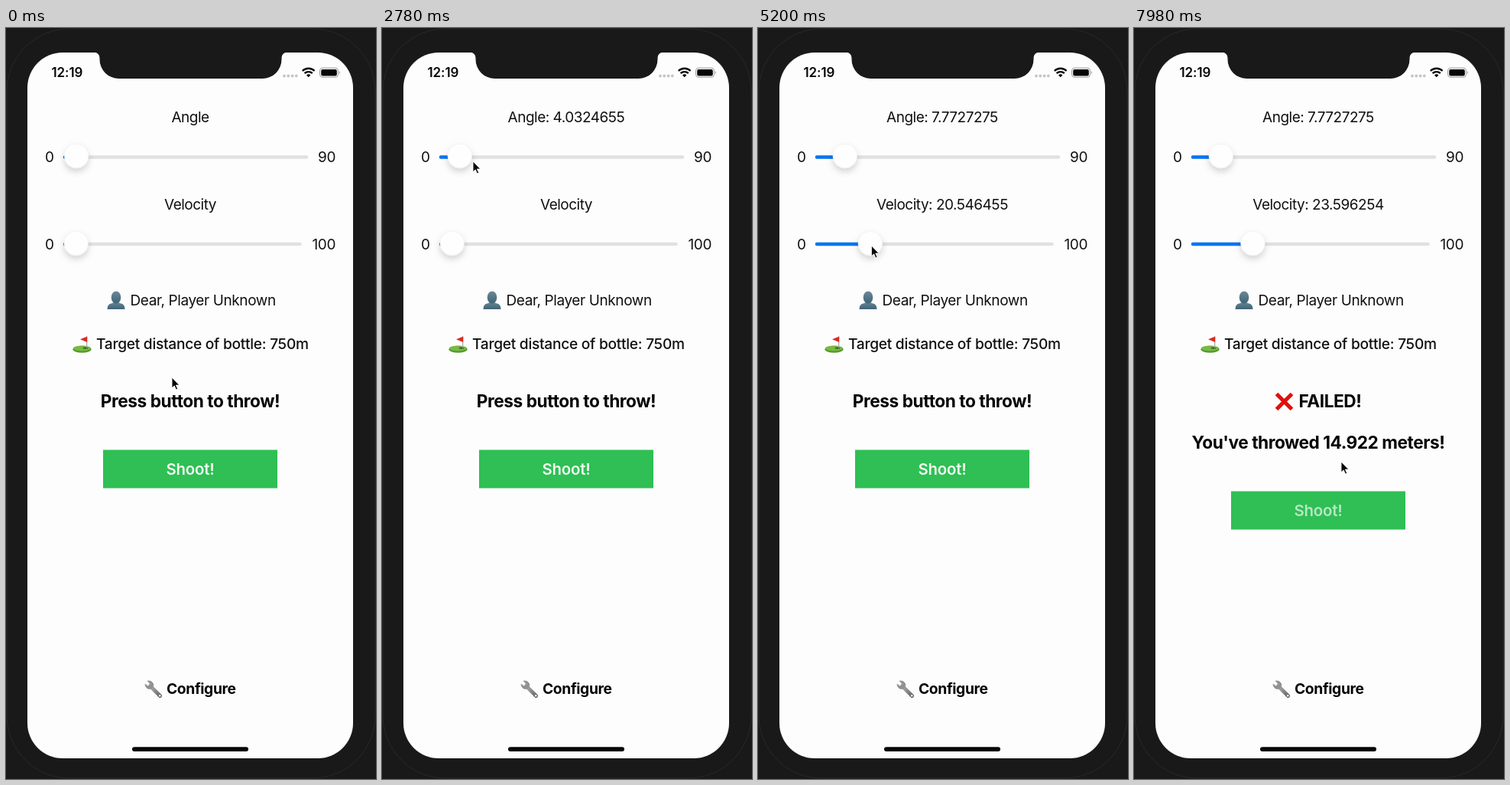
An HTML page for the animation above (8 s loop, 484 by 980 pixels).

```html
<!DOCTYPE html>
<html lang="en">
<head>
<meta charset="utf-8">
<title>Throw game</title>
<style>
  html, body { margin: 0; width: 100%; height: 100%; overflow: hidden; background: #19191a; }
  svg { display: block; width: 100vw; height: 100vh; }
  text { font: 400 19px Inter, Roboto, sans-serif; letter-spacing: -.021em; fill: #101010; }
  .mid { text-anchor: middle; }
  .end { text-anchor: end; }
  .label { letter-spacing: -.026em; }
  .medium { font-size: 19.2px; font-weight: 450; letter-spacing: -.015em; }
  .bold { font-size: 22.7px; font-weight: 680; letter-spacing: -.021em; fill: #050505; }
  .small { font-size: 19.3px; }
  .clock { font-size: 17px; font-weight: 640; letter-spacing: -.005em; }
  .shoot { font-size: 20.4px; font-weight: 640; letter-spacing: -.01em; fill: #f0faf2; }
  .track { stroke: #e1e1e1; stroke-width: 4.5; stroke-linecap: round; }
  .fill { stroke: #0a74f2; stroke-width: 4.5; stroke-linecap: round; }
  .knob { fill: #fefefe; stroke: #efefef; stroke-width: .6; filter: url(#shadow); }
</style>
</head>
<body>
<svg viewBox="0 0 484 980" preserveAspectRatio="none">
  <defs>
    <filter id="shadow" x="-60%" y="-60%" width="220%" height="240%">
      <feDropShadow dx="0" dy="4.5" stdDeviation="4.5" flood-color="#000" flood-opacity=".17"/>
    </filter>
    <linearGradient id="skin" x2="0" y2="1">
      <stop stop-color="#6d8996"/><stop offset="1" stop-color="#3d6478"/>
    </linearGradient>
    <linearGradient id="steel" x2="1" y2="1">
      <stop stop-color="#aeb0b2"/><stop offset="1" stop-color="#66686a"/>
    </linearGradient>
  </defs>

  <!-- Phone -->
  <rect width="484" height="980" fill="#19191a"/>
  <rect x="1" y="1" width="482" height="978" rx="82" fill="none" stroke="#28282a"/>
  <rect x="28" y="32" width="426" height="921" rx="46" fill="#fdfdfd"/>
  <path d="M115 31.5 Q122 32 122.5 39 V41 A25 25 0 0 0 147.5 66 H335.5 A25 25 0 0 0 360.5 41 V39 Q361 32 368 31.5Z" fill="#19191a"/>
  <rect x="165" y="938.2" width="152" height="5.7" rx="2.85" fill="#050505"/>

  <!-- Status bar -->
  <text class="bold clock" x="59.5" y="64">12:19</text>
  <g fill="#c6c6c6">
    <circle cx="364" cy="62.5" r="1.9"/><circle cx="369.3" cy="62.5" r="1.9"/>
    <circle cx="374.6" cy="62.5" r="1.9"/><circle cx="379.8" cy="62.5" r="1.9"/>
  </g>
  <path d="M387.8 56 a11.2 11.2 0 0 1 15.8 0 M390.6 59.2 a7.2 7.2 0 0 1 10.2 0" fill="none" stroke="#050505" stroke-width="2.4"/>
  <path d="M395.7 64.3 l-2.7 -2.8 a3.8 3.8 0 0 1 5.4 0z" fill="#050505"/>
  <rect x="410.5" y="52.2" width="24" height="12" rx="3.5" fill="none" stroke="#999"/>
  <rect x="412.2" y="53.9" width="20.6" height="8.6" rx="2" fill="#050505"/>
  <path d="M436 56 q2 2.2 0 4.4z" fill="#999"/>

  <!-- Sliders -->
  <text class="mid label" id="angleLabel" x="241" y="123"></text>
  <text x="51" y="175">0</text>
  <text class="end" x="431" y="175">90</text>
  <path class="track" d="M77 168.5 H393"/>
  <path class="fill" id="angleFill"/>
  <circle class="knob" id="angleKnob" cy="167" r="15.8"/>
  <text class="mid label" id="velocityLabel" x="241" y="237"></text>
  <text x="51" y="289">0</text>
  <text class="end" x="431" y="289">100</text>
  <path class="track" d="M77 282 H384.5"/>
  <path class="fill" id="velocityFill"/>
  <circle class="knob" id="velocityKnob" cy="281" r="15.8"/>

  <!-- Player -->
  <g fill="url(#skin)">
    <path d="M132.5 367 q0 -6.5 5 -7.5 q4 -.8 4 -3 h5 q0 2.2 4 3 q5 1 5 7.5z"/>
    <ellipse cx="144" cy="351.5" rx="6.3" ry="8"/>
  </g>
  <text x="162.5" y="362">Dear, Player Unknown</text>

  <!-- Target -->
  <ellipse cx="99.5" cy="419.3" rx="12" ry="4.5" fill="#4f9a2c"/>
  <ellipse cx="99.5" cy="418" rx="11.3" ry="3.4" fill="#79b943"/>
  <ellipse cx="104" cy="417.6" rx="3.4" ry="1.2" fill="#3a5c22"/>
  <path d="M105.7 402.5 V417.5" stroke="#aaa" stroke-width="1.2"/>
  <path d="M106.2 402.5 L97 406.3 L106.2 410Z" fill="#dd2a20"/>
  <text class="medium" x="118" y="419">Target distance of bottle: 750m</text>

  <!-- Message -->
  <text class="bold mid" id="prompt" x="241" y="495">Press button to throw!</text>
  <g id="result">
    <path d="M186.5 477.5 L206.5 497.5 M206.5 477.5 L186.5 497.5" stroke="#e10f0b" stroke-width="5.2"/>
    <text class="bold" x="215.5" y="495">FAILED!</text>
    <text class="bold mid" x="241" y="549">You've throwed 14.922 meters!</text>
  </g>

  <g id="button">
    <rect x="127" y="550.5" width="228" height="50" fill="#2fbf55"/>
    <text class="shoot mid" id="shoot" x="241" y="583">Shoot!</text>
  </g>

  <!-- Configure -->
  <path d="M188.5 858.5 L201.5 871.5" stroke="url(#steel)" stroke-width="5.2" stroke-linecap="round"/>
  <path d="M184.5 851.8 q5 -1.2 7.6 2.4 q2.1 3.2 .3 6.4 q-2.6 3.2 -6.6 2 q-4 -1.8 -4.3 -7 l4.6 3.2 l2.6 -2.6z" fill="#8f9193"/>
  <circle cx="201.2" cy="871.2" r="1.2" fill="#fdfdfd"/>
  <text class="bold small" x="210" y="869">Configure</text>

  <path id="cursor" d="M0 0 V13.8 L3.2 10.9 L5.5 16 L7.7 15 L5.4 10.1 H9.8Z" fill="#050505" stroke="#fdfdfd" stroke-width=".9"/>
</svg>
<script>
const DURATION = 8000, TICK = 20;
const ANGLE_DRAG = 2100, VELOCITY_DRAG = 4480, THROW = 7360;

// Keys: [time, ...values]
const angleKeys = [[ANGLE_DRAG, 1], [2780, 4.0324655], [3240, 7.7727275]];
const velocityKeys = [[VELOCITY_DRAG, 1], [4780, 4.0775404], [5340, 23.596254]];
const cursorKeys = [
  [0, 217, 456], [1080, 138, 194], [1240, 138, 194], [1800, 110, 174],
  [ANGLE_DRAG, 110, 174], [2780, 119, 174], [3240, 131, 174],
  [3420, 131, 174], [4180, 93, 284], [VELOCITY_DRAG, 93, 284],
  [4780, 102, 284], [5340, 157, 284], [5420, 157, 284],
  [5860, 230, 491], [6600, 262, 540], [7080, 277, 583],
  [7400, 277, 583], [7900, 271, 566],
];

const el = id => document.getElementById(id);

function sample(keys, t) {
  const next = keys.findIndex(key => key[0] > t);
  if (next === 0) return keys[0].slice(1);
  if (next < 0) return keys[keys.length - 1].slice(1);
  const a = keys[next - 1], b = keys[next];
  const u = (t - a[0]) / (b[0] - a[0]);
  const eased = u * u * (3 - 2 * u);
  return a.slice(1).map((value, i) => value + (b[i + 1] - value) * eased);
}

function drawSlider(id, title, y, scale, keys, t) {
  const [value] = sample(keys, t);
  const x = 88.9 + scale * value;
  el(id + "Label").textContent = t > keys[0][0] ? `${title}: ${value.toPrecision(8)}` : title;
  el(id + "Knob").setAttribute("cx", x);
  el(id + "Fill").setAttribute("d", `M77 ${y} H${x}`);
}

function draw(t) {
  drawSlider("angle", "Angle", 168.5, 3.2, angleKeys, t);
  drawSlider("velocity", "Velocity", 282, 2.82, velocityKeys, t);
  const thrown = t >= THROW;
  el("prompt").style.display = thrown ? "none" : "";
  el("result").style.display = thrown ? "" : "none";
  el("button").setAttribute("transform", `translate(0 ${thrown ? 54 : 0})`);
  el("shoot").style.fill = thrown ? "#b6e8c4" : "";
  el("cursor").setAttribute("transform", `translate(${sample(cursorKeys, t)})`);
}

const start = performance.now();
function frame() {
  const elapsed = (performance.now() - start) % DURATION;
  draw(Math.floor(elapsed / TICK) * TICK);
  requestAnimationFrame(frame);
}
frame();
</script>
</body>
</html>
```
